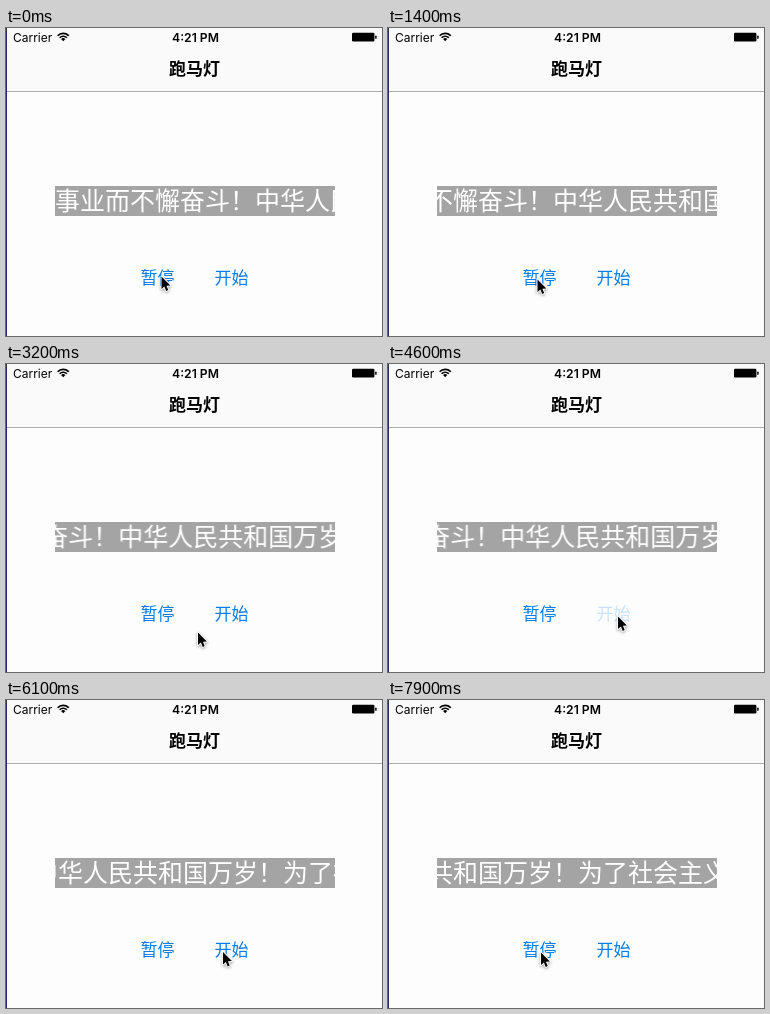
Recreate the animation shown at these times as an HTML page with a canvas. Size 376 by 308 pixels, loop 8000 ms.

```html
<!DOCTYPE html>
<html lang="zh-CN">
<head>
<meta charset="utf-8">
<title>跑马灯</title>
<style>
  html, body { margin: 0; width: 100%; height: 100%; overflow: hidden; background: #fdfdfd; }
  #stage { position: relative; width: 376px; height: 308px; overflow: hidden; color: #000;
    font-family: "Noto Sans CJK SC", "Noto Sans CJK", sans-serif; }
  #stage > * { position: absolute; white-space: nowrap; }
  #bar { left: 0; top: 0; width: 376px; height: 63px; background: #fafafa; border-bottom: 1px solid #acacac; }
  #carrier { left: 7px; top: 2px; font: 12px/15px Inter, sans-serif; }
  #clock { left: 0; top: 2px; width: 379px; text-align: center; font: 600 12.2px/15px Inter, sans-serif; }
  #title { left: 0; width: 377px; top: 29px; text-align: center; font-weight: 600; font-size: 17px; line-height: 22px; }
  #box { left: 49px; top: 158px; width: 280px; height: 30px; overflow: hidden; background: #a4a4a4; }
  #line { position: absolute; left: 0; top: -2px; color: #fff; font-size: 25px; line-height: 30px;
    font-weight: 300; will-change: transform; }
  .button { top: 238px; color: #077de8; font-size: 17px; line-height: 22px; }
  #pause { left: 134.5px; }
  #start { left: 208.5px; }
  canvas { left: 0; top: 0; }
</style>
</head>
<body>
<div id="stage">
  <div id="bar"></div>
  <div id="carrier">Carrier</div>
  <div id="clock">4:21 PM</div>
  <div id="title">跑马灯</div>
  <div id="box"><div id="line">事业而不懈奋斗！中华人民共和国万岁！为了社会主义事业</div></div>
  <div id="pause" class="button">暂停</div>
  <div id="start" class="button">开始</div>
  <canvas id="art" width="376" height="308"></canvas>
</div>
<script>
const LOOP = 8000, STEP = 100, SPEED = 0.06;
const $ = id => document.getElementById(id);
const ctx = $('art').getContext('2d');

// spans in which the marquee runs
const runs = [[0, 2280], [4680, 7550]];
// pointer stops: time, x, y
const path = [
  [0, 155, 248], [400, 152, 252], [900, 149, 251], [2300, 149, 251],
  [2700, 276, 273], [3200, 191.5, 268], [3600, 139, 265], [3800, 139, 265],
  [4000, 229.5, 252], [5500, 229.5, 252], [5900, 216.5, 251.5], [6300, 216.5, 251.5],
  [6600, 152.5, 252], [LOOP, 152.5, 252]
];

const clamp = v => Math.min(1, Math.max(0, v));

function scrolled(t) {
  return runs.reduce((sum, [a, b]) => sum + Math.max(0, Math.min(t, b) - a), 0) * SPEED;
}

function pointerAt(t) {
  const i = Math.max(1, path.findIndex(p => p[0] > t));
  const [t0, x0, y0] = path[i - 1], [t1, x1, y1] = path[i];
  const k = clamp((t - t0) / (t1 - t0)), e = k * k * (3 - 2 * k);
  return [x0 + (x1 - x0) * e, y0 + (y1 - y0) * e];
}

// a pressed label dims at once and fades back after release
function pressAlpha(t, down, up) {
  return t < down ? 1 : 0.2 + 0.8 * clamp((t - up) / 350);
}

function drawWifi() {
  const x = 57.2, y = 13.2, half = 0.8;
  ctx.strokeStyle = ctx.fillStyle = '#000';
  ctx.lineWidth = 1.6;
  for (const r of [5, 7.8]) {
    ctx.beginPath();
    ctx.arc(x, y, r, -Math.PI / 2 - half, -Math.PI / 2 + half);
    ctx.stroke();
  }
  ctx.beginPath();
  ctx.moveTo(x, y);
  ctx.arc(x, y, 3, -Math.PI / 2 - half, -Math.PI / 2 + half);
  ctx.fill();
}

function drawBattery() {
  ctx.fillStyle = '#000';
  ctx.beginPath();
  ctx.roundRect(346, 4.8, 22.4, 8.7, 1.2);
  ctx.fill();
  ctx.beginPath();
  ctx.roundRect(369.2, 7.5, 1.4, 3.4, 0.7);
  ctx.fill();
}

function drawPointer(x, y) {
  const shape = [[0, 0], [0, 12.6], [2.9, 9.9], [4.7, 14.4], [6.7, 13.5], [4.9, 9.2], [8.9, 9]];
  ctx.save();
  ctx.translate(x + 0.5, y + 0.5);
  ctx.beginPath();
  shape.forEach(p => ctx.lineTo(...p));
  ctx.closePath();
  ctx.lineJoin = 'round';
  ctx.lineWidth = 1.8;
  ctx.strokeStyle = '#fff';
  ctx.shadowColor = 'rgba(0,0,0,.4)';
  ctx.shadowBlur = 3;
  ctx.shadowOffsetY = 1;
  ctx.stroke();
  ctx.shadowColor = 'transparent';
  ctx.fillStyle = '#000';
  ctx.fill();
  ctx.restore();
}

function draw(now) {
  const t = Math.floor((now % LOOP) / STEP) * STEP;
  $('line').style.transform = `translateX(${-scrolled(t)}px)`;
  $('pause').style.opacity = t < 4000 ? pressAlpha(t, 2200, 2280) : pressAlpha(t, 7450, 7550);
  $('start').style.opacity = pressAlpha(t, 4600, 4680);
  ctx.clearRect(0, 0, 376, 308);
  ctx.fillStyle = '#26305c';
  ctx.fillRect(0, 0, 1, 308);
  drawWifi();
  drawBattery();
  drawPointer(...pointerAt(t));
}

const begin = performance.now();
function tick() {
  draw(performance.now() - begin);
  requestAnimationFrame(tick);
}
tick();
</script>
</body>
</html>
```
